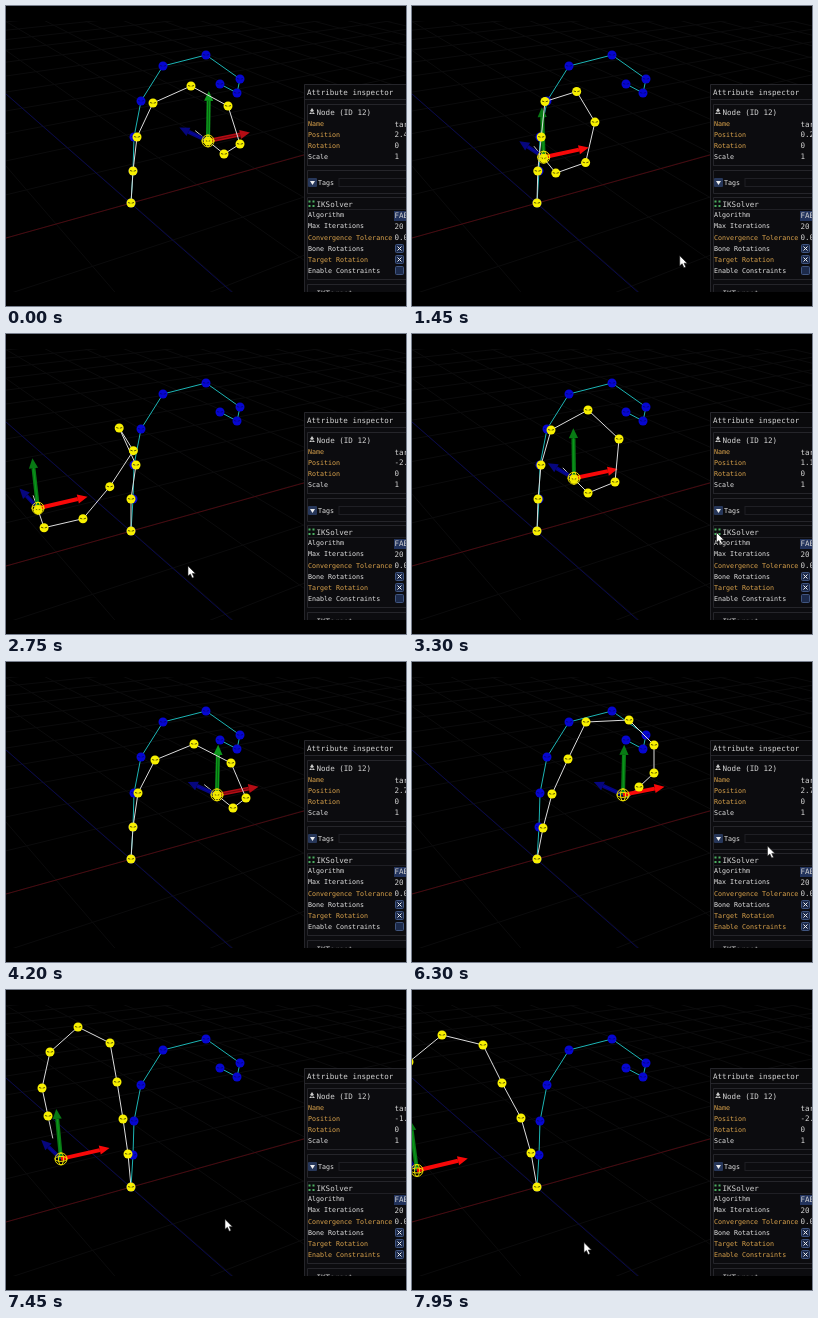
Recreate the animation shown at these times as an HTML page with a canvas. Size 400 by 300 pixels, loop 8 s.

```html
<!DOCTYPE html>
<html lang="en">
<head>
<meta charset="utf-8">
<style>
html, body { margin: 0; width: 100%; height: 100%; overflow: hidden; background: #000; }
canvas, svg { position: absolute; left: 0; top: 0; width: 400px; height: 300px; }
text { font: 6.67px "DejaVu Sans Mono", "Liberation Mono", monospace; fill: #e4e4e4; white-space: pre; }
.big { font-size: 7.55px; fill: #d4d4d4; }
.mod { fill: #dca44c; }
</style>
</head>
<body>
<canvas id="scene" width="400" height="300"></canvas>
<svg viewBox="0 0 400 300">
  <clipPath id="view"><rect y="15" width="400" height="271"/></clipPath>
  <g id="panel" clip-path="url(#view)">
    <rect x="298" y="78" width="102" height="208" fill="#0c0c0f"/>
    <rect x="298" y="78" width="102" height="15" fill="#0a0a0c"/>
    <path d="M298.5 286V78.5H400M298 93.5H400M301.5 160V98.5H400M301.5 159.5H400M301.5 187.5V164.5H400M301.5 187.5H400M301.5 273.5V191.5H400M301.5 273.5H400M301.5 286V278.5H400" fill="none" stroke="#25252a"/>
    <path d="M333 180.5H400M333 172.5H400M333 172V181M301 203.5H400" fill="none" stroke="#1f1f24"/>
    <rect x="302" y="172" width="9" height="9" rx="1" fill="#27375a"/>
    <path d="M304 175h5l-2.5 4z" fill="#eee"/>
    <path d="M306 102l2 3-2 1-2-1zM303 108l2-2 1 2zM309 108l-2-2-1 2z" fill="#ccc"/>
    <path d="M302.5 194.5h2v2h-2zM306.5 194.5h2v2h-2zM302.5 199h2v2h-2zM306.5 199h2v2h-2z" fill="#4caf62"/>
    <rect x="388" y="205" width="12" height="10" fill="#22335c"/>
  </g>
  <path id="cursor" d="M0 0V10L2.4 8L4.2 12L6 11.2L4.3 7.4H7.4Z" fill="#fff" stroke="#222" stroke-width=".6"/>
</svg>
<script>
const c = document.getElementById("scene").getContext("2d");
const panel = document.getElementById("panel");
const cursor = document.getElementById("cursor");
const LOOP = 8000, TOGGLE = 5200;
const root = [125, 197];

function svg(tag, attrs, text = "") {
  const el = document.createElementNS("http://www.w3.org/2000/svg", tag);
  for (const k in attrs) el.setAttribute(k, attrs[k]);
  el.textContent = text;
  return panel.appendChild(el);
}
const label = (x, y, text, cls = "") => svg("text", { x, y, class: cls }, text);

label(301, 88.5, "Attribute inspector", "big");
label(310.5, 108.5, "Node (ID 12)", "big");
label(310.5, 200.5, "IKSolver", "big");
label(310.5, 290, "IKTarget", "big");
label(312, 178.5, "Tags");
[[120, "Name", 1], [130.5, "Position", 1], [141.5, "Rotation", 1], [152.5, "Scale"], [211, "Algorithm"],
 [222.3, "Max Iterations"], [233.5, "Convergence Tolerance", 1], [244.5, "Bone Rotations"],
 [255.5, "Target Rotation", 1]].forEach(([y, s, mod]) => label(302, y, s, mod ? "mod" : ""));
const enable = label(302, 266.5, "Enable Constraints");
[[120.5, "target"], [142, "0"], [153, "1"], [212, "FABRIK"], [223, "20"], [234, "0.001"]]
  .forEach(([y, s]) => label(388.5, y, s, "big"));
const position = label(388.5, 131, "", "big");
const ticks = [238, 249, 260].map(y => {
  svg("rect", { x: 389.5, y: y + .5, width: 8, height: 8, rx: 1, fill: "#1c2a4a", stroke: "#40557f" });
  return svg("path", { d: `M391.5 ${y + 2.5}l4 4m0-4l-4 4`, stroke: "#eee" });
});

// Target x over time, and cursor position over time
const targetKeys = [[0, 202], [250, 202], [1100, 175], [1900, 76], [2150, 31], [2400, 15], [2750, 32],
  [3300, 162], [3600, 205], [3750, 211], [6400, 211], [6950, 114], [7450, 55], [7950, 5]];
const cursorKeys = [[250, 340, 310], [1050, 312, 262], [1900, 218, 236], [2150, 175.5, 226.5], [2400, 160, 222],
  [2750, 182, 232], [3300, 304.5, 198.5], [3600, 345, 234], [3750, 358, 242], [4000, 410, 200], [4500, 410, 250],
  [5000, 391, 258], [6150, 391, 258], [6300, 355.5, 184], [6450, 382, 132], [6950, 266, 206], [7950, 172, 252.5]];

// Chain joints after the root: free poses by target x, constrained poses by time
const freePoses = [
  [5, 125, 165, 130, 131, 112, 94, 124, 118, 95, 158, 58, 188, 16, 199, 5, 181],
  [31, 125, 165, 130, 131, 113, 94, 127, 117, 103, 153, 76, 185, 37, 194, 31, 176],
  [162, 126, 165, 129, 131, 139, 96, 176, 76, 207, 105, 203, 148, 176, 159, 162, 145],
  [202, 127, 165, 131, 131, 147, 97, 185, 80, 222, 100, 234, 138, 218, 148, 202, 135],
  [211, 127, 165, 132, 131, 149, 98, 188, 82, 225, 101, 240, 136, 227, 146, 211, 133]];
const boundPoses = [
  [TOGGLE, ...freePoses[4].slice(1)],
  [5350, 131, 166, 140, 132, 156, 97, 174, 60, 217, 58, 242, 83, 242, 111, 227, 125],
  [6400, 131, 166, 140, 132, 156, 97, 174, 60, 217, 58, 242, 83, 242, 111, 227, 125],
  [6950, 126, 166, 120, 130, 133, 96, 147, 59, 152, 99, 142, 143, 126, 166, 114, 156],
  [7450, 122, 164, 117, 129, 111, 92, 104, 53, 72, 37, 44, 62, 36, 98, 42, 126],
  [7950, 119, 163, 109, 128, 90, 93, 71, 55, 30, 45, -3, 72, -18, 102, -16, 128]];
const rest = pairs([127, 165, 128, 131, 135, 95, 157, 60, 200, 49, 234, 73, 231, 87, 214, 78]);

function at(keys, k) {
  let i = 1;
  while (i < keys.length - 1 && keys[i][0] < k) i++;
  const a = keys[i - 1], b = keys[i];
  const f = Math.min(1, Math.max(0, (k - a[0]) / (b[0] - a[0])));
  return a.slice(1).map((v, j) => v + (b[j + 1] - v) * f);
}
function pairs(flat) {
  const out = [root];
  for (let i = 0; i < flat.length; i += 2) out.push([flat[i], flat[i + 1]]);
  return out;
}
function line(points, color, width = 1) {
  c.strokeStyle = color;
  c.lineWidth = width;
  c.beginPath();
  points.forEach(p => c.lineTo(...p));
  c.stroke();
}
function oval(x, y, rx, ry, fill, stroke) {
  c.beginPath();
  c.ellipse(x, y, rx, ry, 0, 0, 7);
  if (fill) { c.fillStyle = fill; c.fill(); }
  if (stroke) { c.strokeStyle = stroke; c.lineWidth = 1; c.stroke(); }
}
function ground(X, Z) {
  const w = 1 + .033 * X + .05 * Z;
  return [125 + (35 * X - 19 * Z) / w, 197 - (9.8 * X + 16.6 * Z) / w];
}
function grid() {
  for (let i = -8; i <= 40; i += 2) {
    line([ground(i, -10), ground(i, 40)], "#0b0b0c");
    line([ground(-8, i), ground(40, i)], "#0b0b0c");
  }
  line([[0, 232], [400, 120.5]], "#480a10");
  line([[0, 88], [228, 288]], "#08084c");
}
function arrow(x, y, dx, dy, color, dark) {
  const n = Math.hypot(dx, dy), ux = dx / n, uy = dy / n;
  const bx = x + dx - ux * 10, by = y + dy - uy * 10;
  line([[x, y], [bx, by]], color, 4);
  line([[x, y], [bx, by]], dark, 1);
  c.fillStyle = color;
  c.beginPath();
  c.moveTo(x + dx, y + dy);
  c.lineTo(bx - uy * 4.6, by + ux * 4.6);
  c.lineTo(bx + uy * 4.6, by - ux * 4.6);
  c.fill();
}
function gizmo(x, y, idle) {
  arrow(x, y, -16.5 - .06 * x, .038 * x - 21, "#06067e", "#0404a8");
  arrow(x, y, (x - 180) * .038, -50, idle ? "#0c9a1c" : "#087a14", idle ? "#06640f" : "#0a9a1c");
  arrow(x, y, 51 - .045 * x, .018 * x - 12, idle ? "#b40c14" : "#f80808", idle ? "#70060c" : "#f80808");
}
function chain(points, bone, joint, mark) {
  line(points, bone);
  for (const [x, y] of points) {
    oval(x, y, 4.5, 4.5, joint);
    line([[x - 3, y - .5], [x - .7, y + .2]], mark);
    line([[x + .7, y + .2], [x + 3, y - .5]], mark);
  }
}
function wireSphere(x, y) {
  const yellow = "#f0e400";
  oval(x, y, 6, 6, 0, yellow);
  oval(x, y, 2.5, 6, 0, yellow);
  oval(x, y, 6, 2.5, 0, yellow);
}

function draw(now) {
  const t = Math.floor(now % LOOP / 50) * 50;
  const [x] = at(targetKeys, t), y = 181.6 - .231 * x;
  const bound = t >= TOGGLE;
  const joints = pairs(bound ? at(boundPoses, t) : at(freePoses, x));
  const [p, q] = joints.slice(-2);

  c.fillStyle = "#000";
  c.fillRect(0, 0, 400, 300);
  c.save();
  c.beginPath();
  c.rect(0, 15, 400, 271);
  c.clip();
  grid();
  chain(rest, "#1cb4b4", "#0606d0", "#040488");
  line([q, [q[0] + (q[0] - p[0]) * .8, q[1] + (q[1] - p[1]) * .8]], "#c8c8c8");
  gizmo(x, y, t < 250 || (t > 3700 && t < TOGGLE));
  chain(joints, "#dcdcdc", "#f8f000", "#5c5600");
  wireSphere(x, y);
  c.restore();

  position.textContent = (.00003 * x * x + .021 * x - 3.04).toFixed(3);
  enable.setAttribute("class", bound ? "mod" : "");
  ticks[2].setAttribute("visibility", bound ? "visible" : "hidden");
  cursor.setAttribute("transform", `translate(${at(cursorKeys, t)})`);
  requestAnimationFrame(() => draw(performance.now() - start));
}
const start = performance.now();
draw(0);
</script>
</body>
</html>
```
